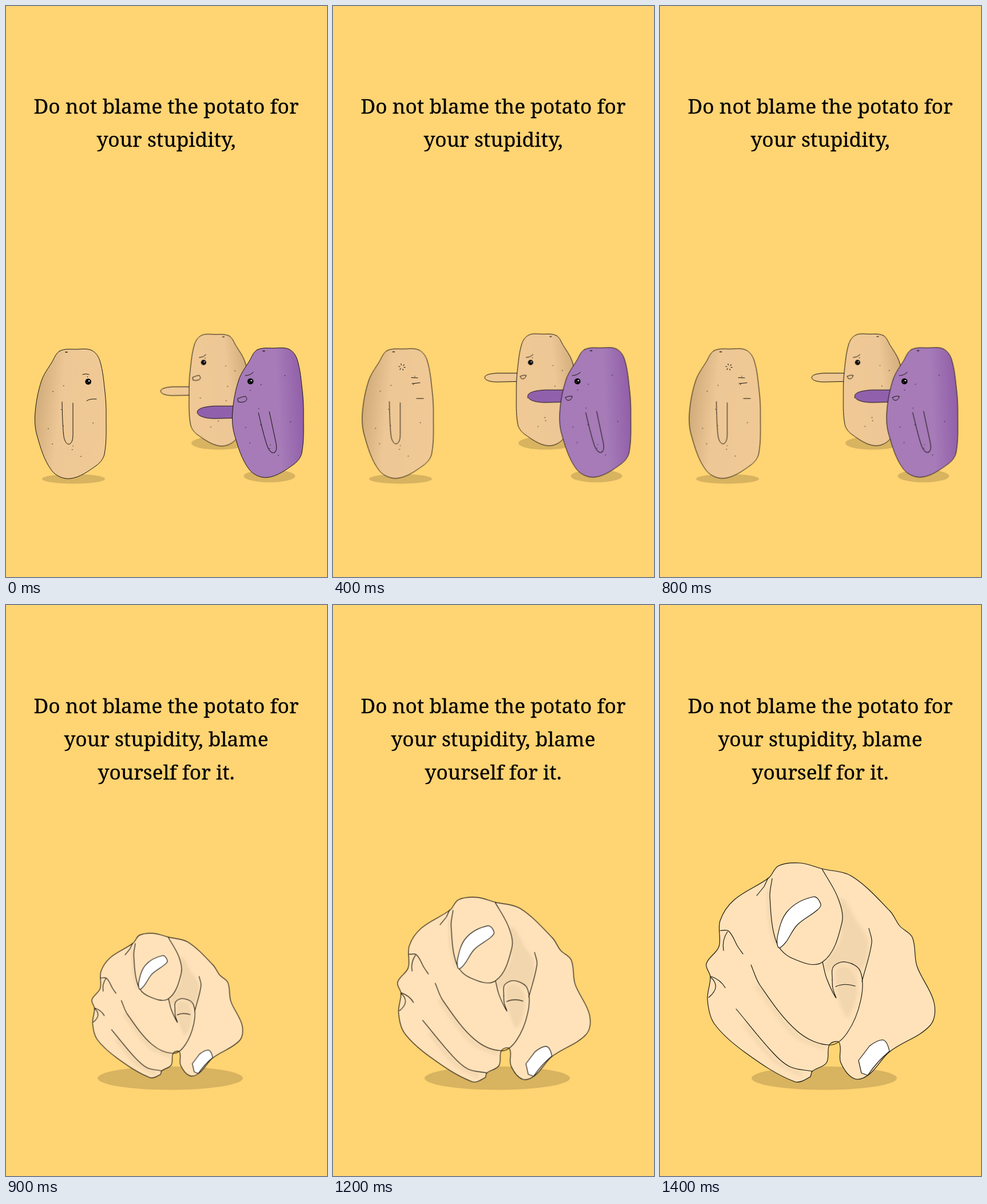
An HTML page for the animation above (1970 ms loop, 561 px wide and 998 px high).

```html
<!DOCTYPE html>
<html lang="en">
<head>
<meta charset="utf-8">
<title>Do not blame the potato</title>
<style>
html, body { margin: 0; width: 100%; height: 100%; overflow: hidden; background: #ffd473; }
svg { display: block; width: 100%; height: 100%; fill: none; stroke: #17120c; stroke-linecap: round; stroke-linejoin: round; }
path { vector-effect: non-scaling-stroke; }
text { font: 35.3px "Noto Serif", serif; text-anchor: middle; fill: #000; stroke: #000; stroke-width: .3px; }
circle, ellipse { stroke: none; }
.shadow { fill: #d8b360; }
.tan { fill: #efc894; }
.violet { fill: #9160ac; }
#specks { stroke-width: 1.4; }
#hand { stroke-width: 1.15; }
.skin { fill: #ffe2ba; }
.shade { fill: #f2d6ad; stroke: none; filter: url(#blur); }
.crease { stroke: #f4d8af; stroke-width: 8; filter: url(#blur); }
.nail { fill: #fff; }

#crowd, #blame, .rest, .point, .nudge, #hand { animation: 1970ms step-end infinite; }
#crowd { animation-name: leave; }
#blame { animation-name: enter; }
.rest { animation-name: rest; }
.point { animation-name: point; }
.nudge { animation-name: nudge; }
#hand { animation-name: grow; transform-origin: 284px 833px; }

@keyframes leave { 0% { opacity: 1 } 45.685%, 100% { opacity: 0 } }
@keyframes enter { 0% { opacity: 0 } 45.685%, 100% { opacity: 1 } }
@keyframes rest {
  0%, 15.228%, 30.457% { opacity: 1 }
  5.076%, 20.305%, 35.533%, 100% { opacity: 0 }
}
@keyframes point {
  0%, 15.228%, 30.457% { opacity: 0 }
  5.076%, 20.305%, 35.533%, 100% { opacity: 1 }
}
@keyframes nudge {
  0%, 15.228%, 30.457% { transform: none }
  5.076%, 20.305%, 35.533%, 100% { transform: translate(.5px, -.6px) }
}
@keyframes grow {
  0%, 45.685% { transform: translate(0, -7px) scale(.66) }
  50.761% { transform: translate(4px, -4px) scale(.71) }
  55.838% { transform: translate(8px, -1px) scale(.76) }
  60.914% { transform: scale(.843) }
  65.99% { transform: scale(.92) }
  71.066%, 100% { transform: none }
}
</style>
</head>
<body>
<svg viewBox="0 0 561 998" preserveAspectRatio="none">
  <defs>
    <filter id="blur" x="-40%" y="-40%" width="180%" height="180%"><feGaussianBlur stdDeviation="3"/></filter>
    <linearGradient id="cream" x1="0" y1=".35" x2="1" y2=".55">
      <stop offset=".05" stop-color="#d3ae7c"/><stop offset=".36" stop-color="#edc795"/><stop offset="1" stop-color="#f0c995"/>
    </linearGradient>
    <linearGradient id="plum" x1="0" y1=".55" x2="1" y2=".45">
      <stop offset=".65" stop-color="#a67bb8"/><stop offset="1" stop-color="#915fa9"/>
    </linearGradient>

    <g id="spud">
      <path data-p="94,603 123,600 150,602 164,620 173,675 175,715 172,783 158,803 112,826 80,812 54,750 51,710 62,655 80,623 z"/>
      <path id="specks"/>
    </g>
    <path id="sleeve" d="M-10 0Q-9 55 -6 65Q-3 74 2 74Q9 72 9 58V2"/>
    <path id="arm" d="M70 -9H25C8 -8 0 -5 0 0C0 5 10 9 25 9L70 8"/>
    <g id="eye">
      <circle r="5.3" fill="#000"/><circle cx="1.5" cy="-1.3" r="1.3" fill="#fff"/><circle cx="-1.8" cy="1.6" r=".6" fill="#ccc"/>
    </g>
    <g id="look"><use href="#eye"/><path d="M-9 -10Q-1 -10 5 -16"/></g>
    <g id="shout"><use href="#look"/><path d="M-22 30Q-15 27 -9 26Q-4 32 -9 35Q-15 38 -21 36Z"/></g>
    <g id="sneer"><use href="#look"/><path d="M-21 28Q-15 25 -9 26Q-11 35 -18 33Z"/></g>
  </defs>

  <g id="crowd">
    <text x="280" y="188">Do not blame the potato for</text>
    <text x="280" y="246">your stupidity,</text>
    <ellipse class="shadow" cx="118" cy="826.5" rx="55" ry="8.5"/>
    <ellipse class="shadow" cx="372" cy="764" rx="48" ry="11.5"/>
    <ellipse class="shadow" cx="460.5" cy="821.5" rx="45" ry="11"/>

    <use href="#arm" class="tan rest" x="318" y="792" transform="scale(.85)"/>
    <use href="#arm" class="tan point" x="312" y="764" transform="scale(.85)"/>
    <g class="nudge"><use href="#spud" fill="url(#cream)" transform="matrix(-.863 0 0 .863 471 56.2)"/></g>
    <g transform="translate(345.3 623) scale(.86)">
      <use href="#shout" class="rest"/>
      <use href="#sneer" class="point"/>
    </g>

    <g transform="scale(1.22)">
      <use href="#arm" class="violet rest" x="274" y="582"/>
      <use href="#arm" class="violet point" x="279" y="559"/>
    </g>
    <g class="nudge">
      <use href="#spud" fill="url(#plum)" x="345" y="-2"/>
      <use href="#sleeve" transform="translate(451 709) rotate(-12)"/>
    </g>
    <g transform="translate(427.2 656)">
      <use href="#shout" class="rest"/>
      <use href="#sneer" class="point"/>
    </g>

    <g class="nudge">
      <use href="#spud" fill="url(#cream)"/>
      <use href="#sleeve" x="108" y="692"/>
    </g>
    <g class="rest">
      <use href="#eye" x="143.7" y="656.5"/>
      <path d="M134 644Q140 642 145 644M141 690Q147 686 158 687"/>
    </g>
    <g class="point">
      <path d="M137 649.5L148 650M138 660L152 658.5M140 662l1.5 -1.5M146 686H158"/>
      <circle cx="120.5" cy="631" r="4.5" style="stroke:#17120c;stroke-width:3;stroke-dasharray:1 3.7;stroke-linecap:butt"/>
    </g>
  </g>

  <g id="blame">
    <text x="280" y="189">Do not blame the potato for</text>
    <text x="280" y="247">your stupidity, blame</text>
    <text x="280" y="305">yourself for it.</text>
    <ellipse class="shadow" cx="287" cy="827" rx="127" ry="20.5"/>
    <g id="hand">
      <path class="skin" data-p="207,456 245,451 283,461 335,474 402,535 419,561 441,581 449,631 479,695 472,735 401,781 366,820 340,828 316,800 315,772 311,763 296,769 291,800 266,815 262,825 235,833 150,783 95,732 83,690 88,650 81,627 103,597 105,552 130,515 190,477 z"/>
      <path class="shade" data-p="312,515 345,555 364,590 350,640 325,625 305,632 292,640 288,625 316,580 z"/>
      <path class="shade" data-p="306,640 328,632 344,655 340,700 325,720 z"/>
      <path class="crease" data-p="190,500 193,550 203,592"/>
      <path class="crease" data-p="170,667 235,750 285,774"/>
      <path class="crease" data-p="150,735 200,795 245,820"/>
      <path class="skin" data-p="283,461 311,512 318,555 284,624 230,617 203,588 192,510 196,478"/>
      <path class="nail" data-p="205,581 223,535 268,510 281,523 275,533 240,559 210,599 z"/>
      <path data-p="301,655 303,632 325,624 350,640 351,690 327,748 296,769 240,745 175,665 159,629"/>
      <path data-p="284,624 291,652 307,686 302,670 301,655"/>
      <path d="M189 477L182 492L169 508M307 667Q322 660 341 666"/>
      <path data-p="365,565 370,590 353,658"/>
      <path data-p="133,706 195,780 227,807 266,815"/>
      <path data-p="105,569 120,570 136,597 145,610"/>
      <path d="M118 571Q108 585 111 604M88 650Q108 667 85 686M89 649Q106 655 114 669"/>
      <path class="nail" d="M347 796L366 771Q380 760 389 760Q397 761 401 780Q380 797 363 822L352 818Z"/>
    </g>
  </g>
</svg>
<script>
// Smooth path through a few points; a trailing "z" closes it.
// Each handle follows the neighbours' direction, a third of the segment long.
function smooth(spec) {
  const closed = spec.endsWith("z");
  const pts = spec.replace(" z", "").split(" ").map(p => p.split(",").map(Number));
  const n = pts.length;
  const at = i => closed ? pts[(i + n) % n] : pts[Math.max(0, Math.min(n - 1, i))];
  const handle = (from, a, b, len) => {
    const dx = b[0] - a[0], dy = b[1] - a[1], k = len / (3 * Math.hypot(dx, dy));
    return [from[0] + dx * k, from[1] + dy * k];
  };
  let d = "M" + pts[0];
  for (let i = 0; i < (closed ? n : n - 1); i++) {
    const [a, b, c, e] = [at(i - 1), at(i), at(i + 1), at(i + 2)];
    const len = Math.hypot(c[0] - b[0], c[1] - b[1]);
    d += `C${handle(b, a, c, len)} ${handle(c, e, b, len)} ${c}`;
  }
  return closed ? d + "Z" : d;
}

// Seeded dots scattered over the skin, after the stem mark.
function speckle(count, seed) {
  const rand = () => (seed = seed * 16807 % 2147483647) / 2147483647;
  let d = "M104 605h3";
  for (let i = 0; i < count; i++) {
    const angle = rand() * 2 * Math.PI, r = Math.sqrt(rand());
    d += `M${113 + 48 * r * Math.cos(angle)} ${713 + 92 * r * Math.sin(angle)}h.1`;
  }
  return d;
}

for (const p of document.querySelectorAll("[data-p]")) p.setAttribute("d", smooth(p.dataset.p));
document.getElementById("specks").setAttribute("d", speckle(11, 4217));
</script>
</body>
</html>
```
